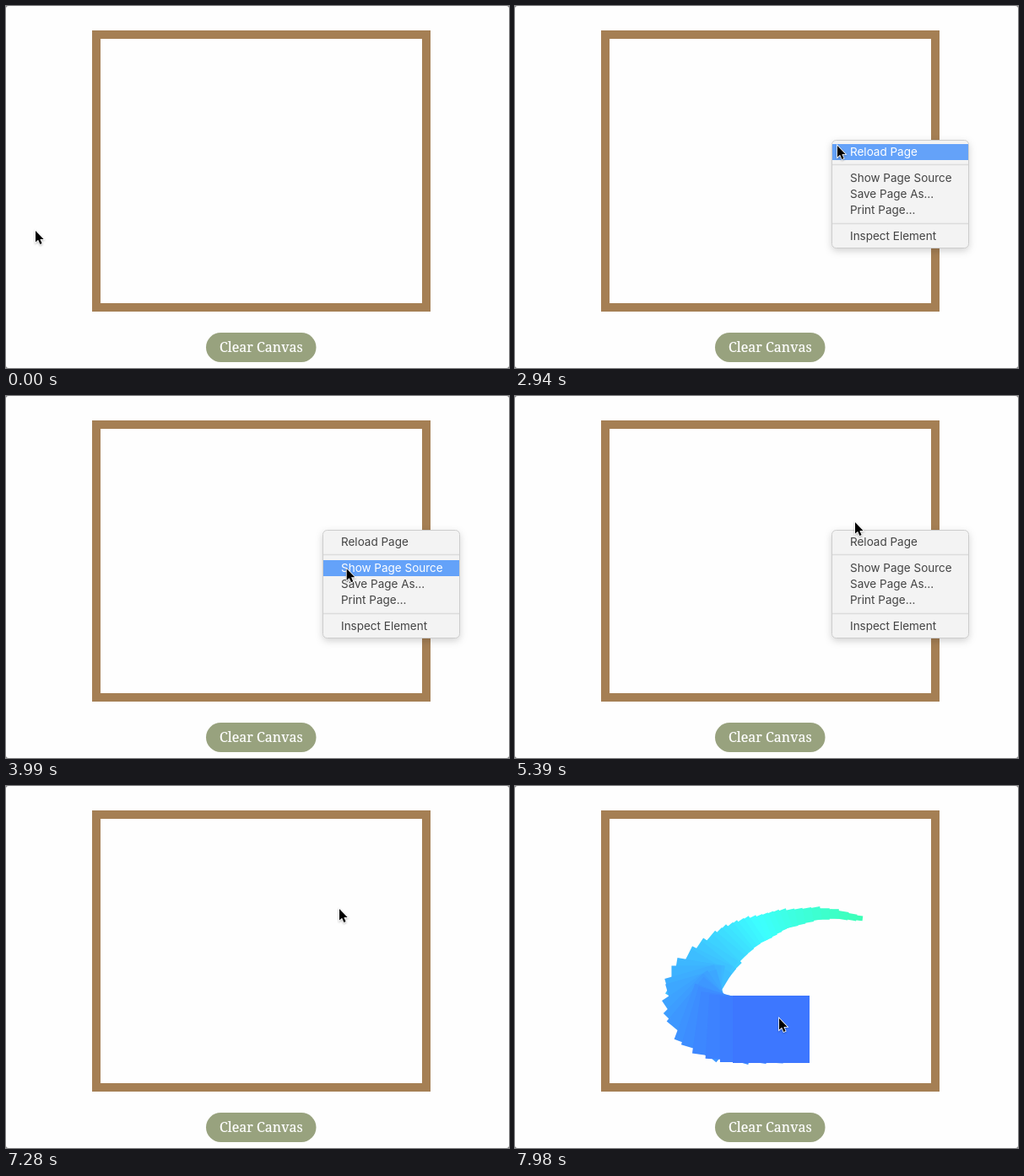
An HTML page that plays this animation: 596 by 430 pixels, repeating every 8000 ms.

```html
<!DOCTYPE html>
<html lang="en">
<head>
<meta charset="utf-8">
<title>Drawing canvas</title>
<style>
  html, body { margin: 0; width: 100%; height: 100%; overflow: hidden; background: #777; }
  svg { display: block; width: 596px; height: 430px; }
  #menu { filter: drop-shadow(0 3px 4px rgba(0, 0, 0, .17)); }
  #menu text { font: 13.5px Inter, Roboto, sans-serif; fill: #444; }
  #menu text.on { fill: #fff; }
  #label { font: 16px "Noto Serif", "Liberation Serif", serif; fill: #fff; stroke: #fff; stroke-width: .2; }
  #cursor { filter: drop-shadow(0 1px .8px rgba(0, 0, 0, .28)); }
</style>
</head>
<body>
<svg viewBox="0 0 596 430">
  <rect width="596" height="430" rx="3" fill="#fefefe"/>
  <rect x="107" y="34" width="391" height="324" fill="#fefefe" stroke="#a57f54" stroke-width="10"/>
  <g id="art" fill="none" stroke-linecap="square"></g>
  <rect x="237" y="388" width="130.5" height="35" rx="17.5" fill="#98a27e"/>
  <text id="label" x="302.3" y="410.5" text-anchor="middle">Clear Canvas</text>
  <g id="menu">
    <rect x="375.5" y="159.5" width="162" height="128" rx="5" fill="#f3f3f3" stroke="#cdcdcd"/>
    <rect id="bar" x="376" width="161" height="19" fill="#64a2f9"/>
    <path d="M376 188.5H537M376 258.5H537" stroke="#dcdcdc" stroke-width="1.6"/>
  </g>
  <path id="cursor" d="M0 0V13.6L3.1 10.8L5.4 16L7.6 15L5.4 10H9.6Z" fill="#000" stroke="#fff" stroke-width="1.6" paint-order="stroke"/>
</svg>
<script>
const LOOP = 8000, STEP = 70, DRAW_START = 7350, DRAW_END = 7980;
const $ = id => document.getElementById(id);

function add(parent, tag, attrs, text) {
  const el = document.createElementNS("http://www.w3.org/2000/svg", tag);
  for (const k in attrs) el.setAttribute(k, attrs[k]);
  if (text) el.textContent = text;
  parent.append(el);
  return el;
}

// Menu items: label and top of the row
const items = [
  ["Reload Page", 164], ["Show Page Source", 195], ["Save Page As…", 214],
  ["Print Page…", 233], ["Inspect Element", 264]
].map(([label, top]) => ({ top, el: add($("menu"), "text", { x: 397, y: top + 14.3 }, label) }));

// Cursor tip: time, x, y
const route = [
  [0, 35, 267], [70, 39, 268], [140, 66, 268], [210, 110, 260], [350, 212, 233],
  [490, 302, 206], [560, 325, 199], [630, 334, 197],
  [980, 334, 197], [1050, 337, 195], [1190, 360, 178], [1330, 377, 164],
  [2870, 377, 164], [2940, 382, 166], [3010, 386, 177], [3150, 398, 222],
  [3290, 408, 269], [3360, 410, 274], [3430, 409, 254],
  [3500, 409, 254], [3570, 408, 253],
  [3640, 408, 253], [3710, 408, 260], [3780, 408, 270], [3850, 407, 258],
  [4060, 402, 179], [4200, 398, 153],
  [4410, 398, 153], [4620, 401, 152],
  [5320, 401, 152], [5390, 403, 150], [5460, 405, 151],
  [5810, 405, 151], [6160, 398, 127],
  [7210, 398, 127], [7280, 395, 146], [7350, 413, 144]
];

// Menu opacity: time, value
const fade = [
  [0, 0], [2100, 0], [2170, .8], [2240, 1], [5810, 1], [5880, .85], [6160, 0], [8000, 0]
];

function at(keys, t) {
  const i = keys.findIndex(k => k[0] > t);
  if (i < 0) return keys[keys.length - 1].slice(1);
  const a = keys[i - 1], b = keys[i], u = (t - a[0]) / (b[0] - a[0]);
  return a.slice(1).map((v, j) => v + (b[j + 1] - v) * u);
}

// Brush path, evenly spaced in pointer events
const knots = [
  [409, 157], [366, 151.5], [323, 158], [292, 168.5], [266, 182], [245, 199],
  [226, 221], [215, 243], [223, 270], [252, 286], [309, 289]
];
const PER = 4, COUNT = (knots.length - 1) * PER;

function brush(s) {
  const last = knots.length - 1;
  const i = Math.min(Math.floor(s / PER), last - 1), u = s / PER - i;
  const k = n => knots[Math.max(0, Math.min(last, n))];
  return [0, 1].map(j => {
    const a = k(i - 1)[j], b = k(i)[j], c = k(i + 1)[j], d = k(i + 2)[j];
    return b + u / 2 * (c - a + u * (2 * a - 5 * b + 4 * c - d + u * (3 * (b - c) + d - a)));
  });
}

// Each event strokes a square-capped segment, wider and bluer than the one before
const strokes = [];
for (let n = 0; n <= COUNT; n++) {
  const [x, y] = brush(n).map(Math.round);
  const [px, py] = brush(Math.max(0, n - 1)).map(Math.round);
  const p = n / COUNT;
  strokes.push(add($("art"), "path", {
    d: `M${n ? px : x - 1} ${py}L${x} ${y}`,
    stroke: `hsl(${156 + 66 * p},100%,62%)`,
    "stroke-width": 4 + 76 * p
  }));
}

function render(time) {
  const t = Math.floor(time % LOOP / STEP) * STEP;
  const s = Math.min(1, (t - DRAW_START) / (DRAW_END - DRAW_START)) * COUNT;
  strokes.forEach((el, n) => el.style.display = n <= s + 1e-6 ? "" : "none");

  let [x, y] = at(route, t);
  if (s >= 0) {
    const [bx, by] = brush(s);
    x = bx + 4;
    y = by - 13;
  }
  $("cursor").setAttribute("transform", `translate(${x} ${y})`);

  const [alpha] = at(fade, t);
  $("menu").style.display = alpha ? "" : "none";
  $("menu").style.opacity = alpha;
  const hit = t >= 2940 && t < 5880 && items.find(m => y >= m.top && y < m.top + 19);
  $("bar").style.display = hit ? "" : "none";
  if (hit) $("bar").setAttribute("y", hit.top);
  items.forEach(m => m.el.classList.toggle("on", m === hit));
}

const start = performance.now();
function tick() {
  render(performance.now() - start);
  requestAnimationFrame(tick);
}
tick();
</script>
</body>
</html>
```
